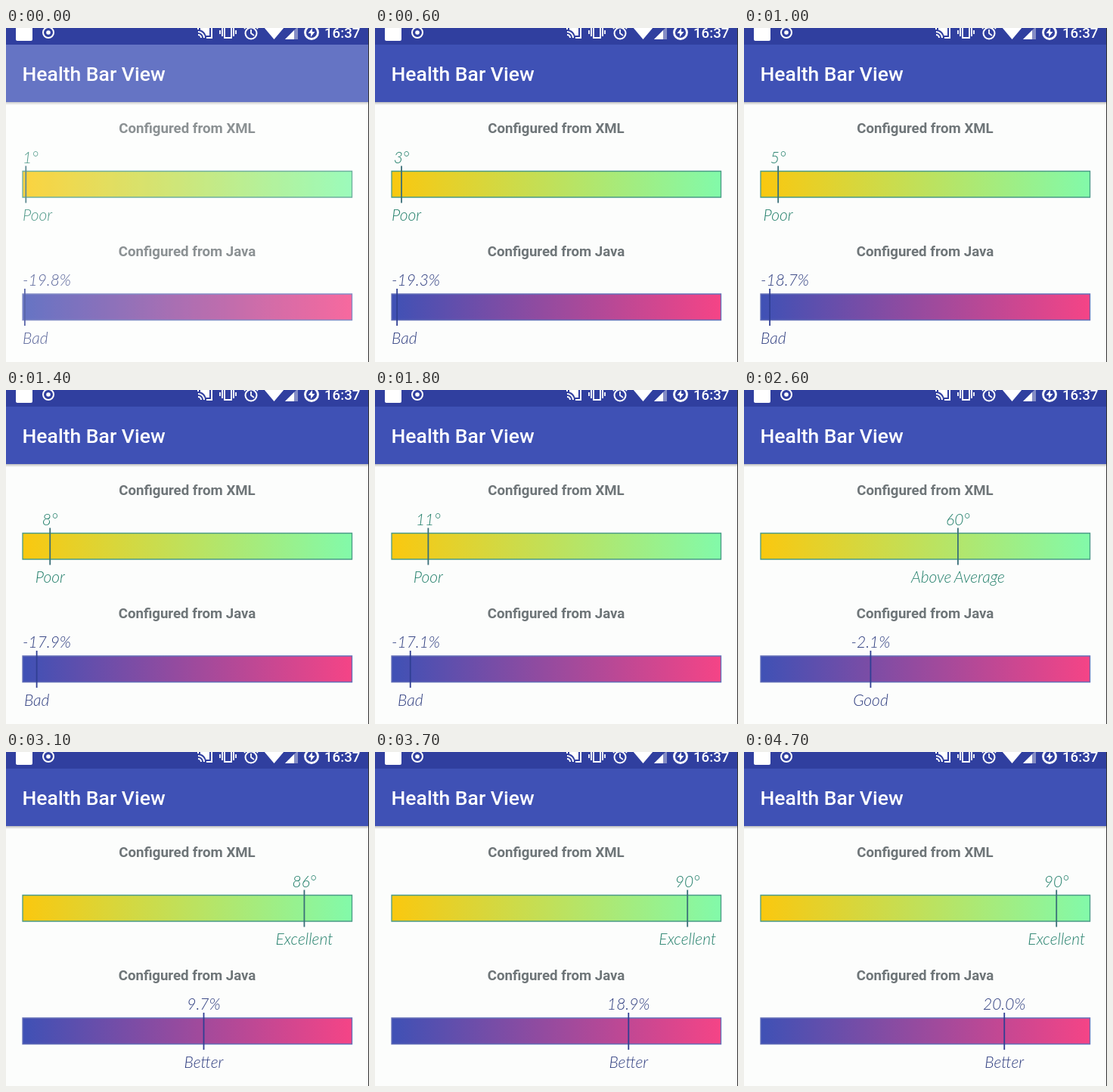
Write an HTML page with a canvas that moves like this. It is 480x442 px and loops after 4800 ms.

```html
<!DOCTYPE html>
<html lang="en">
<head>
<meta charset="utf-8">
<title>Health Bar View</title>
<style>
html, body { margin: 0; width: 100%; height: 100%; overflow: hidden; background: #fcfdfc; }
canvas { display: block; width: 480px; height: 442px; }
</style>
</head>
<body>
<canvas id="stage" width="480" height="442"></canvas>
<script>
const ctx = document.getElementById('stage').getContext('2d');
const LOOP = 4800, STEP = 100;
const LEFT = 22, RIGHT = 458, INSET = 1.5;

// Playback time -> app time: slow at first, then real speed.
const CLOCK = [[0, 108], [600, 220], [1400, 386], [1800, 451], [1900, 510], [2600, 1215], [3700, 2322], [4000, 2600]];

const BARS = [
  { title: 'Configured from XML', y: 189.5, min: 0, max: 100, from: 0, to: 90, duration: 2000,
    labels: ['Poor', 'Below Average', 'Above Average', 'Excellent'], format: v => Math.round(v) + '°',
    ink: '#25806c', line: '#3a6f78', border: '#4a9a86', colors: ['#fac80f', '#82faaa'] },
  { title: 'Configured from Java', y: 352, min: -20, max: 34, from: -20, to: 20, duration: 2600,
    labels: ['Bad', 'Good', 'Better', 'Best'], format: v => v.toFixed(1) + '%',
    ink: '#303f80', line: '#303f93', border: '#6470b8', colors: ['#3f51b5', '#f54486'] }
];

function appTime(t) {
  for (let i = 1; i < CLOCK.length; i++) {
    const [t0, a] = CLOCK[i - 1], [t1, b] = CLOCK[i];
    if (t < t1) return a + (b - a) * (t - t0) / (t1 - t0);
  }
  return CLOCK[CLOCK.length - 1][1];
}

function rect(x, y, w, h, color) {
  ctx.fillStyle = color;
  ctx.fillRect(x, y, w, h);
}

function text(str, x, y, font, color, align = 'left') {
  ctx.font = font;
  ctx.fillStyle = color;
  ctx.textAlign = align;
  ctx.fillText(str, x, y);
}

function stroke(path, width = 2, color = '#fff') {
  ctx.lineWidth = width;
  ctx.strokeStyle = color;
  ctx.stroke(new Path2D(path));
}

function fill(path, color = '#fff') {
  ctx.fillStyle = color;
  ctx.fill(new Path2D(path));
}

function circle(x, y, r, width) {
  ctx.beginPath();
  ctx.arc(x, y, r, 0, Math.PI * 2);
  ctx.lineWidth = width;
  ctx.strokeStyle = ctx.fillStyle = '#fff';
  width ? ctx.stroke() : ctx.fill();
}

function statusBar() {
  rect(0, 0, 480, 22, '#303f9f');
  fill('M13 0H35V15Q35 17 33 17H15Q13 17 13 15Z');
  circle(56, 6, 7, 2);
  circle(56, 6, 2.8);
  // cast
  stroke('M254 2V-2H272V13H265M254 5A8 8 0 0 1 262 13M254 9A4 4 0 0 1 258 13');
  fill('M257 0H269V10H264.500A11 11 0 0 0 257 2.500Z');
  // vibrate
  stroke('M289 -3H298V13H289ZM286 0V11M301 0V11M283 3V8M304 3V8', 1.8);
  // alarm
  circle(324, 7, 7.5, 2);
  stroke('M324 2V7L328 10M315 1L319 -3M333 1L329 -3', 1.8);
  // wifi and signal
  fill('M341 -1Q354.500 -8 368 -1L354.500 15Z');
  fill('M369 15L386 -2V15Z', '#858dc5');
  fill('M369 15L381 3V15Z');
  // battery
  circle(404, 6, 8.5, 2.8);
  fill('M405 0L399.500 7H403V12L408.500 5H405Z');
  text('16:37', 421, 13, '500 18.67px Roboto, sans-serif', '#fff');
}

function toolbar(veil) {
  const shadow = ctx.createLinearGradient(0, 98, 0, 102);
  shadow.addColorStop(0, 'rgba(0,0,0,.25)');
  shadow.addColorStop(1, 'rgba(0,0,0,0)');
  rect(0, 98, 480, 4, shadow);
  rect(0, 22, 480, 76, '#3f51b5');
  rect(0, 22, 480, 420, `rgba(255,255,255,${veil})`);
  text('Health Bar View', 21.5, 69.5, '500 26.5px Roboto, sans-serif', '#fff');
}

function label(str, x, y, color) {
  ctx.font = 'italic 300 21px Lato, sans-serif';
  ctx.wordSpacing = '-2px';
  const half = ctx.measureText(str).width / 2;
  text(str, Math.min(Math.max(x, LEFT + half), RIGHT - half), y, ctx.font, color, 'center');
  ctx.wordSpacing = '0px';
}

function healthBar(bar, time) {
  const p = Math.min(time / bar.duration, 1);
  const eased = (1 - Math.cos(Math.PI * p)) / 2;
  const value = bar.from + (bar.to - bar.from) * eased;
  const share = (value - bar.min) / (bar.max - bar.min);
  const x = LEFT + INSET + share * (RIGHT - LEFT - 2 * INSET);
  const { y } = bar;

  text(bar.title, 239.5, y - 50.5, 'bold 18.67px Roboto, sans-serif', '#6e7578', 'center');
  const gradient = ctx.createLinearGradient(LEFT, 0, RIGHT, 0);
  bar.colors.forEach((c, i) => gradient.addColorStop(i, c));
  rect(LEFT, y, RIGHT - LEFT, 34.5, gradient);
  stroke(`M${LEFT} ${y}H${RIGHT - .5}V${y + 34.5}H${LEFT}Z`, 1.3, bar.border);
  stroke(`M${x} ${y - 7}V${y + 42}`, 1.8, bar.line);
  label(bar.format(value), x, y - 11, bar.ink);
  label(bar.labels[Math.floor(share * 4)], x, y + 65.5, bar.ink);
}

function draw(now) {
  const t = Math.floor(now % LOOP / STEP) * STEP;
  const time = appTime(t);
  rect(0, 0, 480, 442, '#fcfdfc');
  BARS.forEach(bar => healthBar(bar, time));
  toolbar(Math.max(0, .2 * (1 - t / 500)));
  statusBar();
  rect(479, 0, 1, 442, '#333');
}

const start = performance.now();
function tick() {
  draw(performance.now() - start);
  requestAnimationFrame(tick);
}
tick();
</script>
</body>
</html>
```
